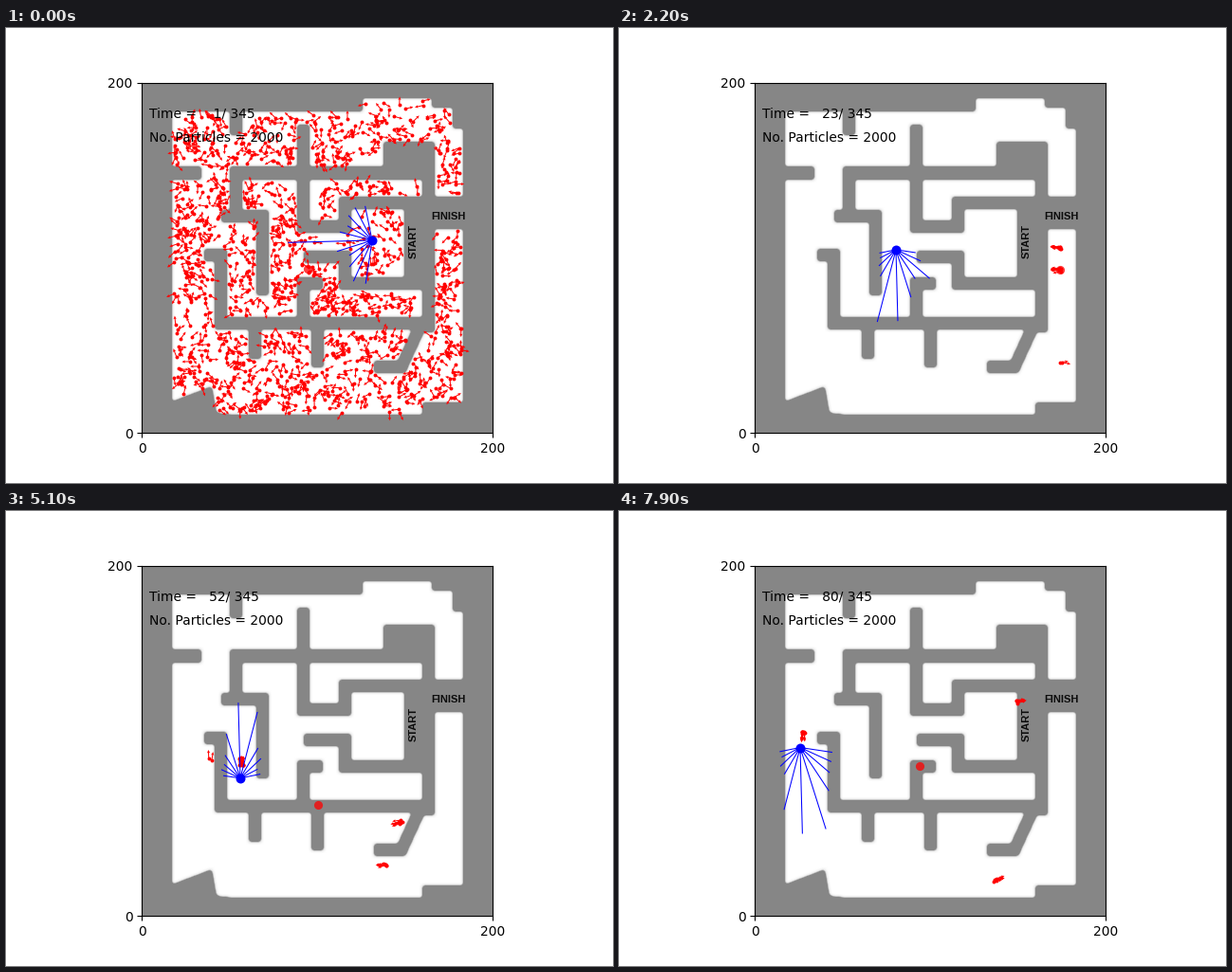
Animation, 640 px wide and 480 px high, one loop 8000 ms. Source, as a matplotlib script:

```python
import numpy as np
import matplotlib.pyplot as plt
from matplotlib.animation import FuncAnimation
from matplotlib.colors import LinearSegmentedColormap
from matplotlib.patches import Rectangle
from matplotlib.path import Path

W, H, FRAMES = 640, 480, 80
SPEED, TURN_TIME = 4.9, 0.8
plt.rcParams["font.family"] = "DejaVu Sans"
plt.rcParams["font.size"] = 10

# Maze in stage pixels (y down): floor outline, solid blocks, bar centre lines
FLOOR = [(175, 89), (376, 89), (376, 75), (449, 75), (449, 85), (471, 85),
         (471, 107), (482, 107), (482, 395), (439, 395), (439, 408),
         (240, 408), (222, 406), (217, 378), (175, 394)]
RAMP = [(388, 351), (413, 351), (429, 316), (443, 316), (421, 364), (388, 364)]
BLOCKS = [(398, 121, 452, 160), (420, 178, 452, 276), (420, 178, 513, 212)]
BARS = [
    [(242, 79), (242, 107)],
    [(170, 153), (199, 153)],
    [(233, 198), (270, 198), (270, 275)],
    [(242, 198), (242, 153), (445, 153), (445, 184)],
    [(313, 109), (313, 209), (357, 209), (357, 184), (445, 184)],
    [(320, 241), (357, 241), (357, 269), (445, 269), (445, 314)],
    [(215, 239), (226, 239), (226, 311), (445, 311)],
    [(313, 311), (313, 269), (327, 269)],
    [(262, 311), (262, 342)],
    [(328, 311), (328, 351)],
]

# Corners the robot drives through
ROUTE = [(386, 224), (292, 224), (292, 302.5), (247, 302.5), (247, 229),
         (191, 229), (191, 300)]

# Each restart of the filter: time -> (anchor time, surviving guesses)
# with every guess given as x, y, heading, particle count
RESTARTS = {
    0: (8, [(385, 169, 3, 8), (301, 203, 100, 1), (245, 258, 270, 1),
            (457, 299, 270, 2), (465, 289, 82, 8), (476, 309, 93, 12),
            (470, 254, 83, 1)]),
    27: (36, [(457, 93, 10, 6), (458, 228, 120, 6), (425, 279, 15, 6),
              (417, 326, 6, 6), (259, 283, 270, 2), (293, 289, 270, 9)]),
}


def wall_mask():
    gy, gx = np.mgrid[0:H, 0:W] + 0.5
    pts = np.column_stack([gx.ravel(), gy.ravel()])

    def inside(poly):
        return Path(poly).contains_points(pts).reshape(H, W)

    mask = ~inside(FLOOR) | inside(RAMP)
    for x0, y0, x1, y1 in BLOCKS:
        mask[y0:y1, x0:x1] = True
    for bar in BARS:
        for a, b in zip(bar, bar[1:]):
            (x0, x1), (y0, y1) = sorted((a[0], b[0])), sorted((a[1], b[1]))
            mask[y0 - 6:y1 + 7, x0 - 6:x1 + 7] = True
    return mask


def soften(mask, *radii):
    img = mask.astype(float)
    for r in radii:
        for axis in (0, 1):
            img = sum(np.roll(img, k, axis)
                      for k in range(-r, r + 1)) / (2 * r + 1)
    return img


def in_wall(z):
    """Wall test for complex positions x - iy."""
    col = np.clip(np.real(z), 0, W - 1).astype(int)
    row = np.clip(-np.imag(z), 0, H - 1).astype(int)
    return walls[row, col]


def plan_drive():
    """Times, places and headings: constant speed, a short stop to turn."""
    z = np.array([complex(x, -y) for x, y in ROUTE])
    legs = np.diff(z)
    angles = np.unwrap(np.angle(legs) % (2 * np.pi)) + np.radians(1.5)
    t, times, spots, turns = 0, [], [], []
    for i, leg in enumerate(legs):
        times += [t, t + abs(leg) / SPEED]
        spots += [z[i], z[i + 1]]
        turns += [angles[i]] * 2
        t = times[-1] + TURN_TIME
    return np.array(times), np.array(spots), np.array(turns)


walls = wall_mask()
times, spots, turns = plan_drive()


def robot(t):
    return np.interp(t, times, spots.real) + 1j * np.interp(t, times, spots.imag)


def heading(t):
    return np.interp(t, times, turns)


def scatter(seed, n=1150):
    """Random particles all over the floor."""
    rng = np.random.default_rng(seed)
    z = rng.uniform(177, 480, 6 * n) - 1j * rng.uniform(77, 406, 6 * n)
    near = soften(walls, 4)[(-z.imag).astype(int), z.real.astype(int)]
    z = z[near < 0.25][:n]
    return z, rng.uniform(0, 2 * np.pi, len(z))


clouds = {start: scatter(start + 5) for start in RESTARTS}


def particles(t):
    """A full cloud at a restart, then guesses that die on hitting a wall."""
    start = max(s for s in RESTARTS if s <= t)
    age = t - start
    cloud, cloud_dir = clouds[start]
    if age == 0:
        return cloud, cloud_dir
    left = int(len(cloud) * 0.15 ** age)
    z = cloud[:left] + SPEED * age * np.exp(1j * cloud_dir[:left])
    keep = ~in_wall(z)
    pos, ang = list(z[keep]), list(cloud_dir[:left][keep])

    rng = np.random.default_rng(t)
    anchor, guesses = RESTARTS[start]
    moved = robot(t) - robot(anchor)
    for x, y, a, n in guesses:
        turn = np.radians(a) - heading(anchor)
        z = complex(x, -y) + moved * np.exp(1j * turn)
        jitter = rng.normal(0, 1, (3, n)) * (n > 1)
        if not in_wall(z):
            pos.extend(z + jitter[0] + 1j * jitter[1])
            ang.extend(heading(t) + turn + 0.08 * jitter[2])
    return np.array(pos), np.array(ang)


def scan(t, reach=88):
    """Eleven noisy range beams fanned around the heading."""
    rng = np.random.default_rng(900 + t)
    z, d, xs, ys = robot(t), np.arange(reach), [], []
    for a in heading(t) + np.radians(16) * np.arange(-5, 6):
        ray = np.exp(1j * a)
        hit = in_wall(z + d * ray)
        dist = hit.argmax() if hit.any() else reach
        end = z + max(2, dist + rng.normal(2.5, 2)) * ray
        xs += [z.real, end.real, np.nan]
        ys += [-z.imag, -end.imag, np.nan]
    return xs, ys


fig = plt.figure(figsize=(W / 100, H / 100), dpi=100, facecolor="white")
stage = fig.add_axes([0, 0, 1, 1], zorder=0)
stage.set(xlim=(0, W), ylim=(H, 0))
stage.axis("off")

frame = fig.add_subplot(zorder=1, facecolor="none")
frame.set(xlim=(0, 200), ylim=(0, 200), xticks=[0, 200], yticks=[0, 200],
          aspect="equal")

shade = LinearSegmentedColormap.from_list(
    "shade", [(0, "white"), (0.3, "#ececec"), (0.6, "#868686"),
              (1, "#868686")])
maze = stage.imshow(soften(walls, 2, 1), cmap=shade, vmin=0, vmax=1,
                    extent=(0, W, H, 0), aspect="auto",
                    interpolation="nearest")
maze.set_clip_path(Rectangle((143.2, 57.6), 369.6, 369.6,
                             transform=stage.transData))
sign = dict(ha="center", va="center", family="Liberation Sans",
            weight="bold", size=8, color="#0c0c0c")
stage.text(466.5, 199.5, "FINISH", **sign)
stage.text(430, 225, "START", rotation=90, **sign)

dots, = stage.plot([], [], "o", color="red", ms=2.8, mew=0, zorder=3)
mean_dot, = stage.plot([], [], "o", color="red", ms=6.6, mew=0, alpha=0.75,
                       zorder=4)
rays, = stage.plot([], [], color="blue", lw=0.75, zorder=5)
body, = stage.plot([], [], "o", color="blue", ms=7.2, mew=0, zorder=6)
clock = frame.text(4, 180, "")
frame.text(4, 166, "No. Particles = 2000")
arrows = []


def update(t):
    while arrows:
        arrows.pop().remove()
    pos, ang = particles(t)
    dots.set_data(pos.real, -pos.imag)
    arrows.append(stage.quiver(
        pos.real, -pos.imag, 9 * np.cos(ang), -9 * np.sin(ang),
        angles="xy", units="xy", scale_units="xy", scale=1, width=1,
        headwidth=3.2, headlength=3.5, headaxislength=3, color="red",
        zorder=3))
    mean, z = pos.mean(), robot(t)
    mean_dot.set_data([mean.real], [-mean.imag])
    rays.set_data(*scan(t))
    body.set_data([z.real], [-z.imag])
    clock.set_text("Time = %4d/ 345" % (t + 1))
    return [dots, mean_dot, rays, body, clock, *arrows]


anim = FuncAnimation(fig, update, frames=FRAMES, interval=100, repeat=True,
                     repeat_delay=0, blit=False)
plt.show()
```
